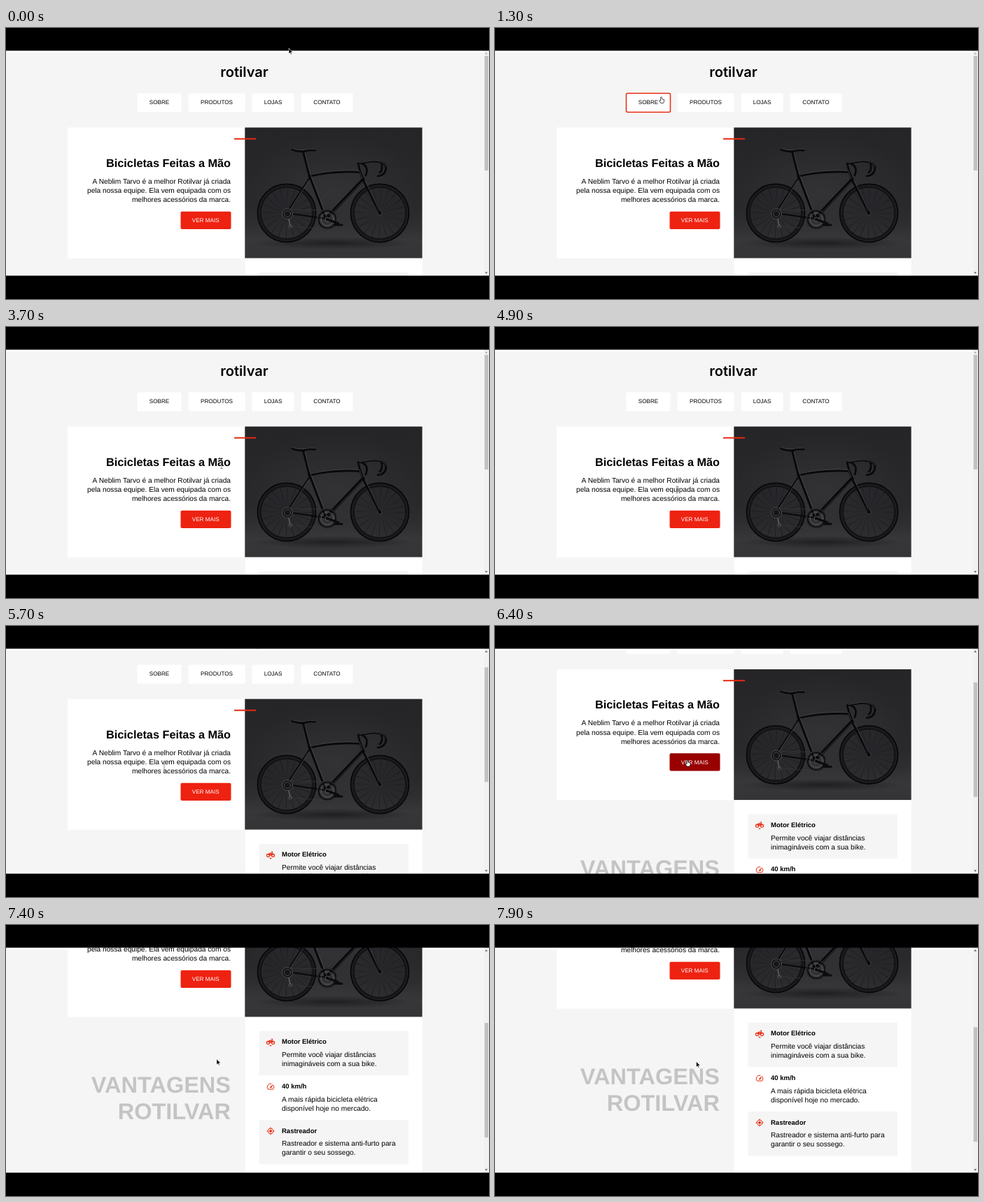
Animation, 690 px wide and 388 px high, one loop 8 s. Source, as an HTML page:

```html
<!DOCTYPE html>
<html lang="pt-BR">
<head>
<meta charset="utf-8">
<title>Loja de bicicletas</title>
<style>
  html, body { margin: 0; width: 100%; height: 100%; overflow: hidden; background: #000; }
  svg { display: block; }
  text { font: 10.16px "Liberation Sans", Arial, sans-serif; text-rendering: geometricPrecision; }
  .logo { font: 600 20px Inter, sans-serif; }
  .label { font-size: 8.13px; text-anchor: middle; }
  .right { text-anchor: end; }
  .title { font-size: 16.25px; font-weight: bold; }
  .section { font-size: 32.5px; font-weight: bold; fill: #c4c4c4; }
  .item { font-size: 9.5px; font-weight: bold; }
  .icon { fill: none; stroke: #e7290f; stroke-width: 1.1; }
  .icon .solid { fill: #e7290f; stroke: none; }
  .line { fill: none; stroke-linecap: round; stroke-linejoin: round; }
</style>
</head>
<body>
<svg width="690" height="388" viewBox="0 0 690 388">
  <defs>
    <linearGradient id="studio" x2="0" y2="1">
      <stop offset="0" stop-color="#252528"/>
      <stop offset=".6" stop-color="#29292c"/>
      <stop offset=".74" stop-color="#2e2e31"/>
      <stop offset=".86" stop-color="#37373a"/>
      <stop offset="1" stop-color="#343437"/>
    </linearGradient>
    <radialGradient id="glow">
      <stop offset="0" stop-color="#424246" stop-opacity=".4"/>
      <stop offset="1" stop-color="#424246" stop-opacity="0"/>
    </radialGradient>
    <radialGradient id="shadow">
      <stop offset="0" stop-color="#151518" stop-opacity=".7"/>
      <stop offset="1" stop-color="#151518" stop-opacity="0"/>
    </radialGradient>
    <g id="wheel" fill="none">
      <circle r="36" fill="#1c1c1f" fill-opacity=".3"/>
      <circle r="38.8" stroke="#151517" stroke-width="6.4"/>
      <circle r="41.6" stroke="#08080a" stroke-width="1.6"/>
      <circle r="39.6" stroke="#333336" stroke-width=".5"/>
      <circle r="35.3" stroke="#38383b" stroke-width=".5"/>
      <circle r="18" stroke="#1b1b1e" stroke-width="35" stroke-dasharray=".45 5.205"/>
      <circle r="3" fill="#0b0b0d" stroke="#58585c" stroke-width=".6"/>
    </g>
  </defs>

  <rect y="32" width="690" height="323" fill="#f5f5f5"/>
  <rect y="32" width="683" height="3" fill="#fff"/>
  <g id="page">
    <text class="logo" x="340.5" y="70" text-anchor="middle">rotilvar</text>
    <g id="nav"></g>

    <rect x="88" y="142.5" width="253.5" height="187.3" fill="#fff"/>
    <g id="photo">
      <rect x="341.3" y="142.5" width="253.3" height="187.2" fill="url(#studio)"/>
      <ellipse cx="468" cy="235" rx="125" ry="85" fill="url(#glow)"/>
      <ellipse cx="467" cy="308" rx="118" ry="9" fill="url(#shadow)"/>
      <use href="#wheel" x="401" y="265"/>
      <use href="#wheel" x="534" y="265"/>
      <g class="line" stroke="#08080a">
        <path stroke-width="2.2" d="M434 214L401 265 457 273"/>
        <path stroke-width="3.2" d="M425 178L433 210 457 273"/>
        <path stroke-width="3.4" d="M433 212Q468 204 506 206L511 219"/>
        <path stroke-width="4.6" d="M510 217L457 273"/>
        <path stroke-width="3.2" d="M510 217Q519 234 534 265"/>
        <path stroke-width="2.6" d="M506 206L503 194 522 191Q540 190 543 199 543 211 531 212M508 194Q519 198 514 211M536 193Q539 203 534 207"/>
        <path stroke-width="3.2" d="M409 174Q421 178 427 176T441 175"/>
      </g>
      <g class="line" stroke="#5a5a5e" stroke-width=".6">
        <path d="M409 172.6Q421 176 427 174.4T441 173.4M427 179L434 207 458 270M436 210Q470 202 505 204.5L509 215M509 220L462 269M513 219Q521 234 533 261M505 193L522 190Q539 189 543 198M432 219L404 263"/>
      </g>
      <g class="line" stroke="#6a6a6e">
        <path stroke="#39393c" stroke-width=".7" d="M403 260L457 261M408 284L457 288"/>
        <circle cx="459" cy="274" r="13" stroke="#0b0b0d" stroke-width="3"/>
        <circle cx="459" cy="274" r="14" stroke-width=".5"/>
        <circle cx="459" cy="274" r="9" stroke-width=".7"/>
        <circle cx="459" cy="274" r="3" fill="#111" stroke-width=".8"/>
        <path stroke="#0b0b0d" stroke-width="3" d="M459 274L475 280M470 282H480"/>
        <circle cx="402" cy="266" r="7.5" fill="#151517" stroke-width=".6"/>
        <circle cx="402" cy="266" r="4.5" stroke-width=".6"/>
        <path stroke-width="1.2" d="M404 274L406 283"/>
        <circle cx="406" cy="284" r="2.2" stroke-width=".6"/>
      </g>
    </g>
    <rect x="326" y="157.7" width="31" height="2" fill="#e7290f"/>

    <text class="title right" x="321" y="198.6">Bicicletas Feitas a Mão</text>
    <text class="right" x="321" y="222.7">A Neblim Tarvo é a melhor Rotilvar já criada</text>
    <text class="right" x="321" y="236">pela nossa equipe. Ela vem equipada com os</text>
    <text class="right" x="321" y="249.2">melhores acessórios da marca.</text>
    <rect id="button" x="249.5" y="262.7" width="72" height="25.4" rx="2"/>
    <text class="label" x="285.2" y="278" fill="#fff">VER MAIS</text>

    <rect x="341.5" y="329.7" width="253.3" height="260" fill="#fff"/>
    <text class="section right" x="321" y="438">VANTAGENS</text>
    <text class="section right" x="321" y="476">ROTILVAR</text>
    <g id="items"></g>
    <g class="icon" transform="translate(378 365.7)">
      <circle cx="-3.5" cy=".8" r="2.1"/><circle cx="3.5" cy=".8" r="2.1"/>
      <path d="M-3.5 .8L-1.5-2.3H2L3.5 .8M-1.5-2.3L0 .8 2-2.3M.8-4.4H2.3L2.8-3"/>
      <path class="solid" d="M-2 4.3H2L0 6Z"/>
    </g>
    <g class="icon" transform="translate(378 429.4) scale(.9)">
      <path d="M-4 4.2A5.3 5.3 0 0 1 1.5-4.4M4-2.8A5.3 5.3 0 0 1 4 4.2H-4"/>
      <path class="solid" d="M4-4L1.2 2Q-.5 3-1.3 1.2Z"/>
    </g>
    <g class="icon" transform="translate(378 493) scale(.92)">
      <circle r="4.1"/><circle class="solid" r="2.1"/>
      <path d="M0-6V-4M0 6V4M-6 0H-4M6 0H4"/>
    </g>
  </g>

  <rect x="683" y="32" width="7" height="323" fill="#f1f1f1"/>
  <rect id="thumb" x="683.7" width="5.3" height="164" fill="#c1c1c1"/>
  <path id="up" d="M684.2 37.5H688L686.1 35.3Z"/>
  <path d="M684.2 349.5H688L686.1 351.7Z" fill="#505050"/>

  <rect width="690" height="32.5"/>
  <rect y="354.6" width="690" height="33.4"/>

  <g id="cursor" stroke-linejoin="round">
    <path id="arrow" d="M0 0V8L1.9 6.3 3.1 9 4.3 8.5 3.1 5.8H5.6Z" stroke="#fff" stroke-width=".6"/>
    <path id="hand" d="M-.9 .6Q0-.4 .9 .6V3.2L4 4V6.5L3 9H-.9L-3 5.4Q-2.4 4.4-.9 5.6Z" fill="#fff" stroke="#222" stroke-width=".8"/>
    <path id="beam" d="M-1.8-4.8H1.8M0-4.8V4.8M-1.8 4.8H1.8" fill="none" stroke="#777" stroke-width=".8"/>
  </g>
</svg>
<script>
const LOOP = 8000, STEP = 100;
const $ = id => document.getElementById(id);

// Each link: label, left edge, width
const links = [['SOBRE', 187.5, 63], ['PRODUTOS', 260.5, 81], ['LOJAS', 351.5, 60], ['CONTATO', 421.5, 74]];
$('nav').innerHTML = links.map(([label, x, w]) =>
  `<rect x="${x}" y="93.5" width="${w}" height="27" rx="2" fill="#fff" stroke-width="1.5"/>
   <text class="label" x="${x + w / 2}" y="109.2">${label}</text>`).join('');
const boxes = [...$('nav').querySelectorAll('rect')];

const items = [
  ['Motor Elétrico', 'Permite você viajar distâncias', 'inimagináveis com a sua bike.'],
  ['40 km/h', 'A mais rápida bicicleta elétrica', 'disponível hoje no mercado.'],
  ['Rastreador', 'Rastreador e sistema anti-furto para', 'garantir o seu sossego.']
];
$('items').innerHTML = items.map(([name, first, second], i) => {
  const y = 349.8 + i * 63.6;
  return `<rect x="361.5" y="${y}" width="213.5" height="63.6" fill="${i % 2 ? '#fff' : '#f5f5f5'}"/>
    <text class="item" x="394" y="${y + 18.5}">${name}</text>
    <text x="394" y="${y + 37.2}">${first}</text>
    <text x="394" y="${y + 50.4}">${second}</text>`;
}).join('');

// Keys: time, value(s)
const scrollKeys = [[5200, 0], [5500, 14], [5700, 38], [5900, 80.5], [6500, 80.5],
  [6800, 100], [7100, 134.5], [7400, 198], [7600, 207], [7900, 210]];
const cursorKeys = [[0, 404, 29], [500, 404, 29], [600, 484, 43], [900, 412, 72], [1200, 260, 90],
  [1400, 215, 107], [1500, 222, 108], [1800, 263, 108], [2300, 322, 108], [2400, 370, 108],
  [2800, 455, 108], [3200, 353, 148], [3400, 353, 148], [3900, 278, 231], [4100, 278, 231],
  [4200, 276, 266], [4400, 272, 272], [4500, 272, 272], [4600, 268, 262], [4900, 260, 233],
  [5000, 260, 233], [5700, 226, 202], [5900, 221, 158], [6400, 275, 192], [6500, 275, 192],
  [7100, 309, 190], [7900, 287.5, 195.5]];

function at(keys, t) {
  const next = keys.findIndex(key => key[0] > t);
  if (next < 1) return (next ? keys[keys.length - 1] : keys[0]).slice(1);
  const a = keys[next - 1], b = keys[next], k = (t - a[0]) / (b[0] - a[0]);
  return a.slice(1).map((v, i) => v + (b[i + 1] - v) * k);
}

const inside = (px, py, x, y, w, h) => px >= x && px <= x + w && py >= y && py <= y + h;

function draw(now) {
  const t = Math.floor(now % LOOP / STEP) * STEP;
  const [scroll] = at(scrollKeys, t);
  const [x, y] = at(cursorKeys, t);
  const pageY = y + scroll;

  $('page').setAttribute('transform', `translate(0 ${-scroll})`);
  $('thumb').setAttribute('y', 40 + scroll * .506);
  $('up').setAttribute('fill', scroll ? '#505050' : '#a3a3a3');

  let overLink = false;
  links.forEach(([, left, width], i) => {
    const hover = inside(x, pageY, left, 93.5, width, 27);
    boxes[i].setAttribute('stroke', hover ? '#e7290f' : 'none');
    overLink ||= hover;
  });
  const overButton = inside(x, pageY, 249.5, 262.7, 72, 25.4);
  $('button').setAttribute('fill', overButton ? '#990000' : '#ee2211');

  const overText = inside(x, pageY, 116, 185, 205, 70);
  const shape = overLink || overButton ? 'hand' : overText ? 'beam' : 'arrow';
  for (const id of ['arrow', 'hand', 'beam']) $(id).style.display = id === shape ? '' : 'none';
  $('cursor').style.display = t >= 200 && t < 600 ? 'none' : '';
  $('cursor').setAttribute('transform', `translate(${x} ${y})`);
}

function tick() {
  draw(performance.now());
  requestAnimationFrame(tick);
}
tick();
</script>
</body>
</html>
```
